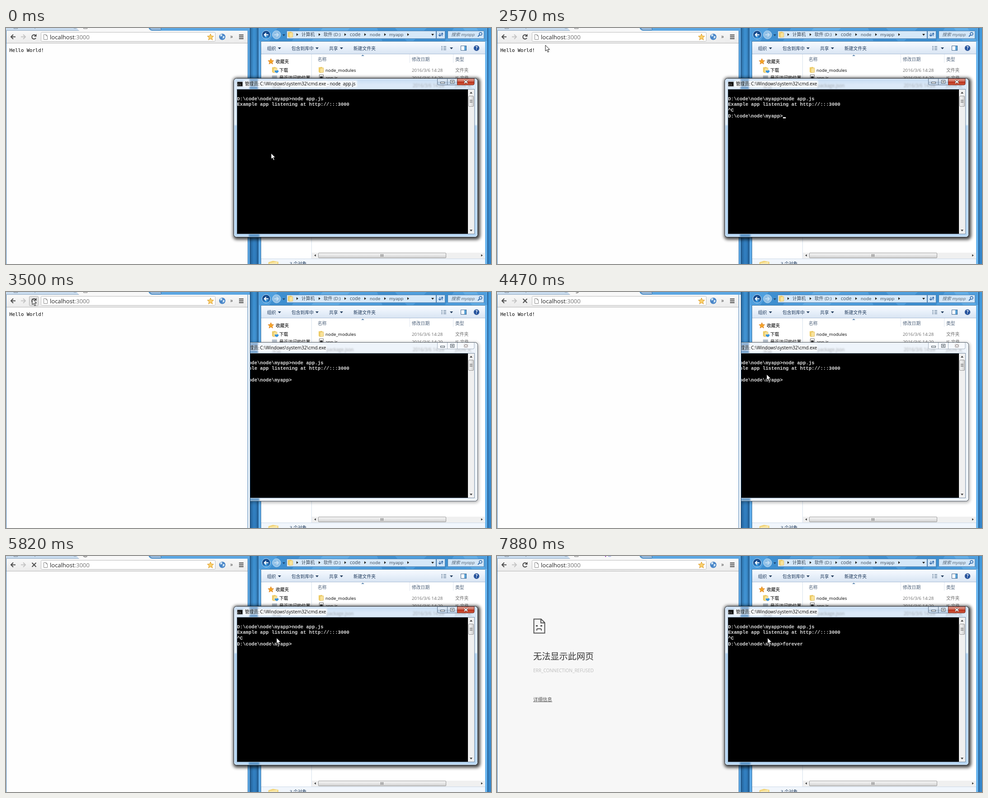
Write an HTML page that moves like this. It is 1072 px wide and 522 px high and loops after 8 s.

```html
<!DOCTYPE html>
<html lang="zh-CN">
<head>
<meta charset="utf-8">
<title>Desktop</title>
<style>
html,body{margin:0;width:100%;height:100%;overflow:hidden;background:#3a8fd4}
svg{display:block;width:1072px;height:522px}
text{font:10px "Open Sans","Noto Sans CJK SC","Noto Sans CJK",sans-serif;white-space:pre}
.cjk text{font-size:9.8px}
.grey{fill:#6d6d6d}
.head{fill:#4c607a}
.con text{font:bold 10.62px "Liberation Mono","Courier New",monospace;fill:#dcdcdc}
.page{font:10.58px "DejaVu Sans Mono","Liberation Mono",monospace}
.line{fill:none;stroke-width:2}
.off{display:none}
.rim{fill:#5ba6e2}
.back .rim{fill:#f4f9fd}
.cmd .idle,.back .cmd .live{display:none}
.back .cmd .idle{display:inline}
.back .cmd{clip-path:url(#right)}
</style>
</head>
<body>
<svg id="stage" viewBox="0 0 1072 522">
<defs>
  <clipPath id="right"><rect x="540" width="532" height="522"/></clipPath>
  <filter id="soft"><feGaussianBlur stdDeviation="1.7"/></filter>
  <filter id="halo" x="-10%" y="-10%" width="120%" height="120%"><feGaussianBlur stdDeviation="3.6"/></filter>
  <linearGradient id="sky" x2="0" y2="1"><stop stop-color="#3f97da"/><stop offset=".3" stop-color="#4a9fe0"/><stop offset=".6" stop-color="#3c8fd2"/><stop offset="1" stop-color="#3384c8"/></linearGradient>
  <linearGradient id="gap"><stop stop-color="#123a62" stop-opacity=".5"/><stop offset=".4" stop-color="#123a62" stop-opacity=".1"/><stop offset=".65" stop-color="#123a62" stop-opacity=".1"/><stop offset="1" stop-color="#123a62" stop-opacity=".5"/></linearGradient>
  <linearGradient id="tool" x2="0" y2="1"><stop stop-color="#f8fbff"/><stop offset=".5" stop-color="#e8f0fa"/><stop offset="1" stop-color="#d8e4f2"/></linearGradient>
  <linearGradient id="bar" x2="0" y2="1"><stop stop-color="#f8f8f8"/><stop offset="1" stop-color="#ebebeb"/></linearGradient>
  <linearGradient id="glass" x2="0" y2="1"><stop stop-color="#c4dbf2"/><stop offset=".04" stop-color="#dbe9f8"/><stop offset=".29" stop-color="#e2effb"/><stop offset=".3" stop-color="#b1d2f0"/><stop offset="1" stop-color="#b9d8f4"/></linearGradient>
  <linearGradient id="red" x2="0" y2="1"><stop stop-color="#e3a396"/><stop offset=".45" stop-color="#cf6a57"/><stop offset=".5" stop-color="#b7301a"/><stop offset="1" stop-color="#d5593c"/></linearGradient>
  <linearGradient id="btn" x2="0" y2="1"><stop stop-color="#e5eff9"/><stop offset=".5" stop-color="#cddcec"/><stop offset=".52" stop-color="#b5c9de"/><stop offset="1" stop-color="#cddff2"/></linearGradient>
  <linearGradient id="thumb" x2="0" y2="1"><stop stop-color="#f6f6f6"/><stop offset=".5" stop-color="#e6e6e6"/><stop offset="1" stop-color="#cfcfcf"/></linearGradient>
  <linearGradient id="thumbv"><stop stop-color="#f6f6f6"/><stop offset=".5" stop-color="#e6e6e6"/><stop offset="1" stop-color="#cfcfcf"/></linearGradient>
  <radialGradient id="orb" cy=".8"><stop stop-color="#3aa0e8"/><stop offset="1" stop-color="#164a8c"/></radialGradient>
  <g id="folder"><path d="M0 1l7-1 2 2v10l-7 1-2-2z" fill="#f0cf6b"/><path d="M3 3l8-1v10l-8 1z" fill="#f9e39a" stroke="#d8b14a" stroke-width=".6"/></g>
  <path id="star" d="M0-7L2-2.3 7-2 3.2 1.5 4.4 6.4 0 3.7-4.4 6.4-3.2 1.5-7-2-2-2.3Z"/>
</defs>

<rect width="1072" height="522" fill="url(#sky)"/>
<rect x="540" width="17" height="522" fill="url(#gap)"/>

<!-- explorer -->
<g class="cjk">
  <rect x="557.5" y="-9" width="507" height="550" fill="#5caae8" stroke="#1d4f80"/>
  <rect x="559" width="504" height="29" fill="#4f9fde"/>
  <path d="M600 0h50l-18 29h-50zM820 0h40l26 29h-54zM930 0h60l-20 29h-70z" fill="#2f80c4" opacity=".5"/>
  <path d="M700 0h60l-25 29h-60zM1010 0h30l20 29h-30z" fill="#7cc0f0" opacity=".4"/>
  <rect x="1059" y="29" width="5" height="493" fill="#68b4ee"/>
  <path d="M1065.5 0V522" stroke="#2a6aa3"/>
  <circle cx="575" cy="15" r="9.3" fill="url(#orb)" stroke="#c8e2f6"/>
  <path d="M580 15h-9m4-4l-4 4 4 4" class="line" stroke="#fff"/>
  <circle cx="598" cy="15" r="9" fill="#8fbfe6" stroke="#c8e2f6"/>
  <path d="M593 15h9m-4-4l4 4-4 4" class="line" stroke="#c4dff4"/>
  <path d="M611 14h6l-3 4z" fill="#1d4a75"/>
  <rect x="620.5" y="6.5" width="330" height="17" fill="#d6e8f8" stroke="#4f7fae"/>
  <rect x="951.5" y="6.5" width="19" height="17" fill="#cfe4f7" stroke="#4f7fae"/>
  <rect x="976.5" y="6.5" width="80" height="17" fill="#d3e6f7" stroke="#4f7fae"/>
  <use href="#folder" x="623" y="8"/>
  <path d="M642 11.5l4 3-4 3zM691 11.5l4 3-4 3zM748 11.5l4 3-4 3zM792 11.5l4 3-4 3zM836 11.5l4 3-4 3zM887 11.5l4 3-4 3zM940 13h6l-3 4z" fill="#222"/>
  <path d="M959 11v6m-3-2l3 3 3-3M964 18v-6m-2 2l2-3 2 3" fill="none" stroke="#2b62a5" stroke-width="1.3"/>
  <g fill="#3c4a5a"><text x="653" y="18">计算机</text><text x="702" y="18">软件 (D:)</text><text x="760" y="18" style="font-size:10.5px">code</text><text x="804" y="18">node</text><text x="847" y="18">myapp</text></g>
  <text x="984" y="18" style="font-style:italic" fill="#5b6b7c">搜索 myapp</text>
  <circle cx="1049" cy="13" r="3" fill="none" stroke="#2c66a8" stroke-width="1.4"/><path d="M1047 15l-4 4" stroke="#2c66a8" stroke-width="1.8"/>
  <rect x="563" y="29" width="496" height="493" fill="#fff"/>
  <rect x="563" y="30" width="496" height="28" fill="url(#tool)"/>
  <path d="M563 57.5h496" stroke="#a9bdd6"/><path d="M563 29.5h496M563.5 29V522" stroke="#39719f"/>
  <g fill="#1e395b"><text x="577" y="48.5">组织</text><text x="631" y="48.5">包含到库中</text><text x="714" y="48.5">共享</text><text x="768" y="48.5">新建文件夹</text>
  <path d="M601 43h7l-3.5 4zM684 43h7l-3.5 4zM738 43h7l-3.5 4zM981 43h7l-3.5 4z"/></g>
  <path d="M962 41h3m-3 3.5h3m-3 3.5h3m2-7h6m-6 3.5h6m-6 3.5h6" stroke="#6f86a0" stroke-width="1.3"/>
  <rect x="1005.5" y="39.5" width="12" height="10" fill="#fff" stroke="#42678f"/><rect x="1013" y="40" width="4" height="9" fill="#58a3d8"/>
  <circle cx="1040" cy="44.5" r="6" fill="#1f4f9c" stroke="#6d87b0"/><text x="1037.7" y="48" fill="#fff" style="font-weight:700">?</text>
  <path d="M675.5 58V511" stroke="#d6e1ee"/><path d="M892.5 58v19M988.5 58v19" stroke="#dfe6ef"/>
  <path d="M785 62l3.5-3 3.5 3z" fill="#5c86b0"/>
  <use href="#star" transform="translate(585.5 74) scale(.9)" fill="#f6a524" stroke="#d8791a"/>
  <text x="596" y="78">收藏夹</text>
  <use href="#folder" x="588" y="86"/><path d="M594 94h6v-2l3 4-4 4-5-3z" fill="#3a94dc"/><text x="604" y="96.5">下载</text>
  <rect x="588" y="105" width="11" height="9" fill="#b8c2cd"/><text x="604" y="114">最近访问的位置</text>
  <g class="head"><text x="689" y="72.5">名称</text><text x="897" y="72.5">修改日期</text><text x="993" y="72.5">类型</text></g>
  <use href="#folder" x="691" y="86"/><text x="706" y="97">node_modules</text>
  <rect x="692.5" y="103.5" width="9" height="11" fill="#fff" stroke="#777"/><rect x="694" y="107" width="6" height="4" fill="#444"/><text x="706" y="114">app.js</text>
  <g class="grey"><text x="897" y="97">2016/3/6 14:28</text><text x="993" y="97">文件夹</text><text x="897" y="114">2016/3/6 14:29</text><text x="993" y="114">JS 文件</text></g>
  <rect x="676" y="497" width="382" height="13" fill="#f0f0f0"/>
  <rect x="690.5" y="497.5" width="282" height="11" rx="1.5" fill="url(#thumb)" stroke="#9a9a9a"/>
  <path d="M828.5 500v6m2.5-6v6m2.5-6v6" stroke="#666"/><path d="M685 500.5v5l-4-2.5zM1050 500.5v5l4-2.5z" fill="#444"/>
  <rect x="564" y="511" width="495" height="11" fill="#f1f6fc"/><path d="M564 510.5h495" stroke="#ccd9e8"/>
  <path d="M580 518l10-3 12 2v5h-22z" fill="#f3d477"/><path d="M582 520l18-3v5h-18z" fill="#fae9ab"/>
  <text x="627" y="525" fill="#1e395b">3 个对象</text>
</g>

<!-- browser -->
<g>
  <rect x="-1" y="-9" width="540.5" height="550" fill="#5ba6e2" stroke="#1d4a75"/>
  <rect class="rim" x="534" y="6" width="5" height="516"/>
  <path d="M0 0H160L164 6H0Z" fill="#c9dcef"/><path d="M0 5.5H161" stroke="#8ea7c0"/>
  <path d="M157 0q2 5 6 6H322q-5-1-7-6z" fill="#f8f8f8"/>
  <path d="M317 0q2 4 6 4.5h18q4 0 1-4.5z" fill="#a8c8e8" stroke="#2f659a"/>
  <path d="M17.5 0V1.5H25.5V0M64 0v2M150 0l2 1.5M153 1.5l2-1.5" fill="none" stroke="#7c8794"/>
  <path id="doc" d="M171.5 0V1.5H179.5V0" fill="#fff" stroke="#777"/>
  <path id="spin" d="M169.5-4a6 6 0 0 0 6 6" class="line" stroke="#8a8a8a"/>
  <g id="title"><rect x="239" y="0" width="2" height="2" fill="#9b40c0"/><path d="M246 0l3 1.5m1 0l2-1.5" stroke="#4d62d8"/></g>
  <rect x="1" y="6" width="533" height="28" fill="url(#bar)"/>
  <path d="M1 33.5H534" stroke="#b6b6b6"/>
  <rect id="hover" x="51.5" y="9.5" width="20" height="21" rx="2" fill="#e4e4e4" stroke="#b0b0b0"/>
  <path d="M21 19.5H11m5-5l-5 5 5 5" class="line" stroke="#4c4c4c"/>
  <path d="M33 19.5H43m-5-5l5 5-5 5" class="line" stroke="#c4c4c4"/>
  <g id="reload"><path d="M66 22a4.7 4.7 0 1 1-1-5.8" class="line" stroke="#4c4c4c"/><path d="M67.5 13v6h-6z" fill="#4c4c4c"/></g>
  <path id="stop" d="M57.5 15l9 9m0-9l-9 9" class="line" stroke="#4c4c4c"/>
  <rect x="77.5" y="9.5" width="385" height="20" rx="2" fill="#fff" stroke="#bdbdbd"/>
  <path d="M83.5 14.5h5l3 3v8h-8zM88.5 14.5v3h3" fill="#fff" stroke="#888"/>
  <text x="97" y="24.5" style="font-size:13px" fill="#222">localhost<tspan fill="#777">:3000</tspan></text>
  <use href="#star" transform="translate(452 20)" fill="#fbd06a" stroke="#d99a2b"/>
  <circle cx="478" cy="19.5" r="7" fill="#4a86c8"/><path d="M473 15q4-3 5 0t-4 4zM479 18q5-1 4 3l-4 3z" fill="#cfe4f4"/>
  <text x="495.5" y="23" fill="#444" style="font-size:12px">»</text>
  <path d="M515 15.5h10m-10 4h10m-10 4h10" class="line" stroke="#444"/>
  <rect id="paper" x="1" y="34" width="533" height="488" fill="#fefefe"/>
  <path d="M.5 6V522" stroke="#3f78ad"/><path d="M534.5 6V522" stroke="#3f78ad"/>
  <text id="hello" class="page" x="7.5" y="52.5">Hello World!</text>
  <g id="error">
    <path d="M81.5 139.5h16l8 8v23h-24zM97 139v9h9" class="line" stroke="#555"/>
    <path d="M86 153h4v3h-4zM96 153h4v3h-4z" fill="#555"/><path d="M88 165v-2q0-2 2-2h6q2 0 2 2v2" class="line" stroke="#555"/>
    <text x="80" y="228.5" fill="#333" style="font-size:19.15px">无法显示此网页</text>
    <text x="80" y="257" fill="#bdbdbd">ERR_CONNECTION_REFUSED</text>
    <text x="80" y="321" fill="#555" style="font-size:10.4px">详细信息</text><path d="M80 322.5h42" stroke="#555"/>
  </g>
</g>

<!-- console window -->
<g class="cmd">
  <rect class="live" x="502" y="110" width="546" height="358" rx="8" filter="url(#halo)" opacity=".75"/>
  <rect class="idle" x="504" y="112" width="541" height="354" rx="7" filter="url(#halo)" opacity=".3"/>
  <rect x="503.5" y="111.5" width="539" height="351" rx="6" fill="url(#glass)" stroke="#1f2b38"/>
  <rect class="idle" x="503.5" y="111.5" width="539" height="351" rx="6" fill="#eef4fb" stroke="#555f6a"/>
  <rect x="504.5" y="112.5" width="537" height="349" rx="5" fill="none" stroke="#fff" opacity=".75"/>
  <g filter="url(#soft)">
    <rect class="live" x="524" y="116" width="186" height="15" fill="#fff" opacity=".7"/>
    <path d="M538 113h19v22h-19zM537 456h23v6h-23z" fill="#3d7fb8" opacity=".8"/>
    <g class="grey" opacity=".55"><text x="708" y="131">package.json</text><text x="899" y="131">2016/3/6 14:28</text><text x="993" y="131">JSON 文</text><text x="588" y="133">桌面</text></g>
    <rect x="528" y="117" width="180" height="13" fill="#fff" opacity=".6"/>
    <rect id="glow" x="700" y="116" width="76" height="15" fill="#fff" opacity=".75"/>
  </g>
  <rect x="511" y="119" width="12" height="10" fill="#111" stroke="#aaa" stroke-width=".7"/>
  <text x="512" y="127" fill="#fff" style="font-size:5.5px">C:\</text>
  <text x="528" y="127" style="font-size:9.8px">管理员:</text><text x="561.5" y="127">C:\Windows\system32\cmd.exe<tspan id="task"> - node  app.js</tspan></text>
  <g stroke="#5e738a">
    <path class="live" d="M953.5 112V123q0 3 3 3H997.5V112z" fill="url(#btn)"/>
    <path class="live" d="M997.5 112V126H1032q3 0 3-3V112z" fill="url(#red)" stroke="#6e2a22"/>
    <path class="idle" d="M953.5 112V123q0 3 3 3H1032q3 0 3-3V112M997.5 112v14" fill="#f6f9fd" stroke="#a5b1be"/>
    <path class="live" d="M975.5 112v14"/>
    <path class="idle" d="M975.5 112v14" stroke="#a5b1be"/>
  </g>
  <g fill="#fff" stroke="#46535f"><rect x="960.5" y="119.5" width="9" height="3"/><rect x="982.5" y="115.5" width="8" height="7"/><rect x="985" y="118" width="3" height="2"/></g>
  <path d="M1013 116l7 6m0-6l-7 6" stroke="#4b3b3b" stroke-width="3.5"/><path d="M1013 116l7 6m0-6l-7 6" stroke="#fff" stroke-width="2"/>
  <rect x="510.5" y="135.5" width="525" height="320" fill="#000" stroke="#7a8ea3"/>
  <rect x="1021" y="136" width="14" height="319" fill="#f0f0f0"/>
  <rect x="1022.5" y="150.5" width="11" height="23" rx="1.5" fill="url(#thumbv)" stroke="#979797"/>
  <path d="M1025 159.5h6m-6 2.5h6m-6 2.5h6" stroke="#666"/><path d="M1025 145h6l-3-4zM1025 446h6l-3 4z" fill="#444"/>
  <g class="con">
    <text x="510.7" y="159.5">D:\code\node\myapp&gt;node app.js</text>
    <text x="510.7" y="172.2">Example app listening at http://:::3000</text>
    <text id="brk" x="510.7" y="185">^C</text>
    <text id="prompt" x="510.7" y="197.7"></text>
    <rect id="caret" width="6.3" height="3" fill="#dcdcdc"/>
  </g>
</g>

<path id="mouse" d="M0 0V13L3 10.3 5.3 15.5 7.5 14.5 5.2 9.5H9.3Z" fill="#fff" stroke="#000" stroke-width=".9"/>
</svg>
<script>
const LOOP = 8000, CELL = 6.372;
const el = id => document.getElementById(id);
const show = (id, on) => el(id).classList.toggle('off', !on);
const within = (t, a, b) => t >= a && t < b;
// value of the last step that has started
const at = (steps, t) => steps.filter(s => s[0] <= t).pop().slice(1);

const mouse = [[0, 586, 277], [400, 593, 278], [2570, 107, 38], [2710, -50, -50],
  [2870, 58, 15], [3890, 530, 159], [4040, 594, 181], [4340, 596, 182], [4890, 598, 181]];
const typed = [[0, 0], [6520, 1], [6790, 3], [7340, 4], [7480, 5], [7750, 6], [7880, 7]];
const blink = [400, 1020, 1480, 1790, 2570, 2870, 5280, 5820, 6370, 7610];

function draw(t) {
  const quit = t >= 1790, loading = within(t, 3650, 5940), failed = t >= 5940;
  const [x, y] = at(mouse, t), [n] = at(typed, t);
  el('mouse').setAttribute('transform', `translate(${x} ${y})`);

  el('stage').classList.toggle('back', within(t, 3500, 4740));
  show('task', !quit);
  show('glow', !quit);
  show('brk', quit);
  el('prompt').textContent = quit ? 'D:\\code\\node\\myapp>' + 'forever'.slice(0, n) : '';
  show('caret', blink.filter(b => b <= t).length % 2);
  el('caret').setAttribute('x', 511 + (quit ? (19 + n) * CELL : 0));
  el('caret').setAttribute('y', quit ? 197 : 184);

  show('hover', within(t, 2990, 3890));
  show('reload', !loading);
  show('stop', loading);
  show('doc', !loading);
  show('spin', loading);
  el('spin').setAttribute('transform', `rotate(${Math.floor(t / 130) * 40} 175.5 -4)`);
  show('title', failed);
  show('hello', t < 5430);
  show('error', failed);
  el('paper').setAttribute('fill', failed ? '#f7f7f7' : '#fefefe');
}

function tick() {
  draw(performance.now() % LOOP);
  requestAnimationFrame(tick);
}
tick();
</script>
</body>
</html>
```
